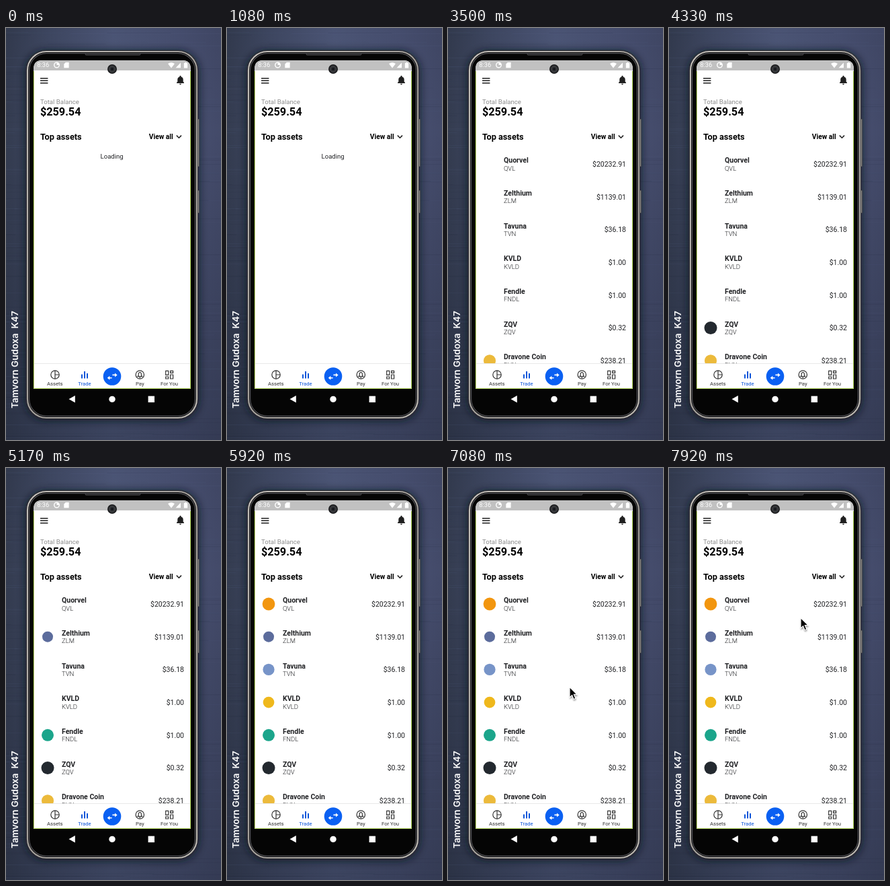
Recreate the animation shown at these times as an HTML page. Size 320x612 px, loop 8 s.

```html
<!DOCTYPE html>
<html lang="en">
<head>
<meta charset="utf-8">
<title>Asset list</title>
<style>
  html, body { margin: 0; width: 100%; height: 100%; overflow: hidden; background: #394159; }
  svg { display: block; width: 320px; height: 612px; }
  text { font-family: Roboto, Arial, sans-serif; fill: #202124; white-space: pre; }
  .bold { font-weight: 700; }
  .label { font-size: 7.7px; text-anchor: middle; fill: #333; }
  .model { font: 600 13.6px Inter, "Open Sans", sans-serif; fill: #fff; }
  .line { fill: none; stroke: #333; stroke-width: 1.2; }
  .thick { stroke: #1c1c1c; stroke-width: 1.5; }
</style>
</head>
<body>
<svg viewBox="0 0 320 612" xmlns="http://www.w3.org/2000/svg">
  <defs>
    <linearGradient id="wall">
      <stop offset="0" stop-color="#343c50"/>
      <stop offset=".2" stop-color="#414a65"/>
      <stop offset=".5" stop-color="#505a7c"/>
      <stop offset=".8" stop-color="#4a5274"/>
      <stop offset="1" stop-color="#434a69"/>
    </linearGradient>
    <linearGradient id="dusk" x1="0" y1="0" x2="0" y2="1">
      <stop offset="0" stop-color="#1f2536" stop-opacity=".12"/>
      <stop offset=".25" stop-color="#1f2536" stop-opacity="0"/>
      <stop offset="1" stop-color="#1f2536" stop-opacity=".42"/>
    </linearGradient>
    <linearGradient id="metal" x1="0" y1="0" x2="1" y2="1">
      <stop offset="0" stop-color="#c5c1bc"/>
      <stop offset=".5" stop-color="#a5a19d"/>
      <stop offset="1" stop-color="#bdb9b4"/>
    </linearGradient>
    <filter id="soft" x="-20%" y="-20%" width="140%" height="140%"><feGaussianBlur stdDeviation="6"/></filter>
    <filter id="blur" x="-50%" y="-50%" width="200%" height="200%"><feGaussianBlur stdDeviation=".9"/></filter>
    <clipPath id="list"><rect x="41" y="170" width="233" height="328.5"/></clipPath>
  </defs>

  <rect width="320" height="612" fill="url(#wall)"/>
  <rect width="320" height="612" fill="url(#dusk)"/>
  <g id="grain"></g>
  <rect x="28" y="33" width="260" height="551" rx="32" fill="#10141f" opacity=".75" filter="url(#soft)"/>
  <text class="model" transform="translate(18.4 565) rotate(-90)">Tamvorn Gudoxa  K47</text>

  <!-- phone body -->
  <g fill="#a09d99" stroke="#2b2b2e" stroke-width=".6">
    <rect x="284.5" y="135" width="3" height="71" rx="1"/>
    <rect x="284.5" y="241" width="3" height="34" rx="1"/>
  </g>
  <rect x="30" y="33" width="256" height="548" rx="30" fill="#25262a"/>
  <rect x="32" y="35" width="252" height="544" rx="28" fill="#050505" stroke="url(#metal)" stroke-width="2.2"/>
  <rect x="34.6" y="37.6" width="246.8" height="538.8" rx="25.5" fill="none" stroke="#55555a" stroke-width="1.2"/>
  <rect x="118" y="37.6" width="82" height="2.6" rx="1.3" fill="#29292b" stroke="#606064" stroke-width=".6"/>

  <!-- screen -->
  <path d="M41 536V61q0-13 13-13H262q13 0 13 13V536z" fill="#fff"/>
  <path d="M41 63V61q0-13 13-13H262q13 0 13 13V63z" fill="#c1c1c1"/>
  <path d="M41.4 64V535.4H274.5V64" fill="none" stroke="#b3dc55" stroke-width="1"/>

  <!-- status bar -->
  <text x="46.3" y="58.4" font-size="9.3" style="fill:#fff">8:36</text>
  <circle cx="75.5" cy="55" r="3.8" fill="none" stroke="#fff" stroke-width="1.4"/>
  <path d="M75.5 55V51.2A3.8 3.8 0 0 1 79.3 55z" fill="#fff"/>
  <path d="M86.3 53.5L88.9 51h4.7v8.2h-7.3z" fill="#fff"/>
  <path d="M241 53q5-3.6 10 0l-5 6.4zM252.6 59.3L260 51.5v7.8zM264.8 52h1.5v-1h2.4v1h1.5v7.6h-5.4z" fill="#fff"/>

  <!-- camera -->
  <circle cx="158" cy="61" r="7" fill="#1c1d1f"/>
  <circle cx="158" cy="61" r="4.6" fill="#303235" stroke="#48494c" stroke-width=".9"/>
  <circle cx="158" cy="61" r="2" fill="#15171c"/>

  <!-- header -->
  <path d="M51 74.7h11.4M51 78.2h11.4M51 81.7h11.4" class="line thick"/>
  <path d="M254 82v-1l1.3-1.3v-3.2q0-3.2 3.1-4v-.6a1 1 0 0 1 2.2 0v.6q3.1.8 3.1 4v3.2l1.3 1.3v1zM258.1 82.8h2.8q0 1.5-1.4 1.5t-1.4-1.5z" fill="#1f1f1f"/>
  <text x="51" y="112.8" font-size="9.6" style="fill:#8b8b8b">Total Balance</text>
  <text class="bold" x="51" y="130.4" font-size="16.2" style="fill:#000">$259.54</text>
  <text class="bold" x="51" y="166" font-size="12.7" style="fill:#000">Top assets</text>
  <text class="bold" x="212.7" y="165" font-size="10.3" style="fill:#000">View all</text>
  <path d="M253.8 159.6l3.6 3.6 3.6-3.6" class="line thick"/>

  <text id="loading" x="157.6" y="194" font-size="9.5" text-anchor="middle">Loading</text>
  <g id="rows" clip-path="url(#list)"></g>

  <!-- tab bar -->
  <path d="M42 498.5H274" stroke="#e8e8e8" stroke-width="1"/>
  <g class="line">
    <circle cx="73" cy="515" r="6.2"/>
    <path d="M73 508.8v12.4M73 515h6.2"/>
    <circle cx="199.3" cy="515" r="6.2"/>
    <path d="M196 517.6h6.6l-1.2-1.5v-2q0-2.3-2.1-2.6q-2.1.3-2.1 2.6v2zM198.4 519.3h1.8"/>
    <path d="M237.7 509.3h4v6h-4zM244.6 509.3h4v3h-4zM237.7 518h4v3h-4zM244.6 515h4v6h-4z"/>
  </g>
  <path d="M113 520.5v-6M117 520.5v-10.5M121 520.5v-7.5" stroke="#0b55d9" stroke-width="2"/>
  <circle cx="158" cy="517.5" r="13.3" fill="#0a60f2"/>
  <g fill="#fff">
    <path d="M158.4 514.6h3.6v-2.2l3.7 3-3.7 3v-2.2h-3.6z"/>
    <path d="M157.6 519h-3.2v-2.2l-3.7 3 3.7 3v-2.2h3.2z"/>
  </g>
  <text class="label" x="72.8" y="531">Assets</text>
  <text class="label" x="117" y="531" style="fill:#0b55d9">Trade</text>
  <text class="label" x="199.3" y="531">Pay</text>
  <text class="label" x="243" y="531">For You</text>

  <!-- system buttons -->
  <path d="M93.5 551.3l9.3-5.3v10.6z" fill="#fff"/>
  <circle cx="158" cy="551.4" r="4.7" fill="#fff"/>
  <rect x="211.6" y="546.7" width="9.4" height="9.4" fill="#fff"/>

  <g id="cursor">
    <path d="M.5 2V17.6L4.1 14.3 6.5 20.2 9.3 19 6.9 13.2H11.7z" fill="#000" stroke="#000" opacity=".4" filter="url(#blur)"/>
    <path d="M0 0V15.6L3.6 12.3 6 18.2 8.8 17 6.4 11.2H11.2z" fill="#000" stroke="#fff" stroke-width="1.2"/>
  </g>
</svg>
<script>
const LOOP = 8000, STEP = 1000 / 12;
const LIST_AT = 1250;
const $ = id => document.getElementById(id);

// name, ticker, price, icon colour, icon radius, time the icon loads
const assets = [
  ["Quorvel", "QVL", "$20232.91", "#f2960f", 9.4, 5910],
  ["Zelthium", "ZLM", "$1139.01", "#5c6c9c", 8, 4910],
  ["Tavuna", "TVN", "$36.18", "#7794c8", 8.6, 5580],
  ["KVLD", "KVLD", "$1.00", "#efb81c", 8.4, 5250],
  ["Fendle", "FNDL", "$1.00", "#1ba58b", 9, 4580],
  ["ZQV", "ZQV", "$0.32", "#23292f", 9.5, 3910],
  ["Dravone Coin", "DVN", "$238.21", "#ecba3b", 9, 3160]
];

// time, x, y of the pointer tip
const path = [
  [6250, 304, 372], [6330, 255, 360], [6420, 215, 352], [6580, 180, 347.5],
  [7080, 181, 325.5], [7750, 185, 287], [7830, 190, 252], [7910, 196, 222.5]
];

function add(parent, tag, attrs, content = "") {
  const el = document.createElementNS("http://www.w3.org/2000/svg", tag);
  for (const key in attrs) el.setAttribute(key, attrs[key]);
  el.textContent = content;
  return parent.appendChild(el);
}

function drawGrain() {
  let seed = 11;
  const rand = () => (seed = seed * 16807 % 2147483647) / 2147483647;
  for (let i = 0; i < 260; i++) {
    add($("grain"), "rect", {
      x: rand() * 340 - 120, y: rand() * 612, width: 60 + rand() * 180, height: .7,
      fill: rand() < .5 ? "#5c6b91" : "#1c2236", opacity: .05 + rand() * .16
    });
  }
}

const icons = assets.map(([name, ticker, price, fill, r], i) => {
  const y = 202 + i * 48.7, rows = $("rows");
  add(rows, "text", { x: 83, y: y - 1.8, "font-size": 10.5, class: "bold" }, name);
  add(rows, "text", { x: 83, y: y + 9.6, "font-size": 9.5, "font-weight": 300 }, ticker);
  add(rows, "text", { x: 265, y: y + 3.8, "font-size": 10.5, "text-anchor": "end" }, price);
  return add(rows, "circle", { cx: 62, cy: y, r, fill });
});

function show(el, on) {
  el.style.display = on ? "" : "none";
}

function pointerAt(t) {
  const next = path.findIndex(p => p[0] > t);
  if (next < 0) return path[path.length - 1].slice(1);
  const [t0, x0, y0] = path[next - 1], [t1, x1, y1] = path[next];
  const k = (t - t0) / (t1 - t0);
  return [x0 + (x1 - x0) * k, y0 + (y1 - y0) * k];
}

function render(time) {
  // the screen refreshes twelve times a second
  const t = Math.floor((time + 5) / STEP) * STEP + 1;
  show($("loading"), t < LIST_AT);
  show($("rows"), t >= LIST_AT);
  icons.forEach((icon, i) => show(icon, t >= assets[i][5]));
  const active = t >= path[0][0];
  show($("cursor"), active);
  if (active) $("cursor").setAttribute("transform", `translate(${pointerAt(t)})`);
}

const start = performance.now();
function tick() {
  render((performance.now() - start) % LOOP);
  requestAnimationFrame(tick);
}

drawGrain();
tick();
</script>
</body>
</html>
```
